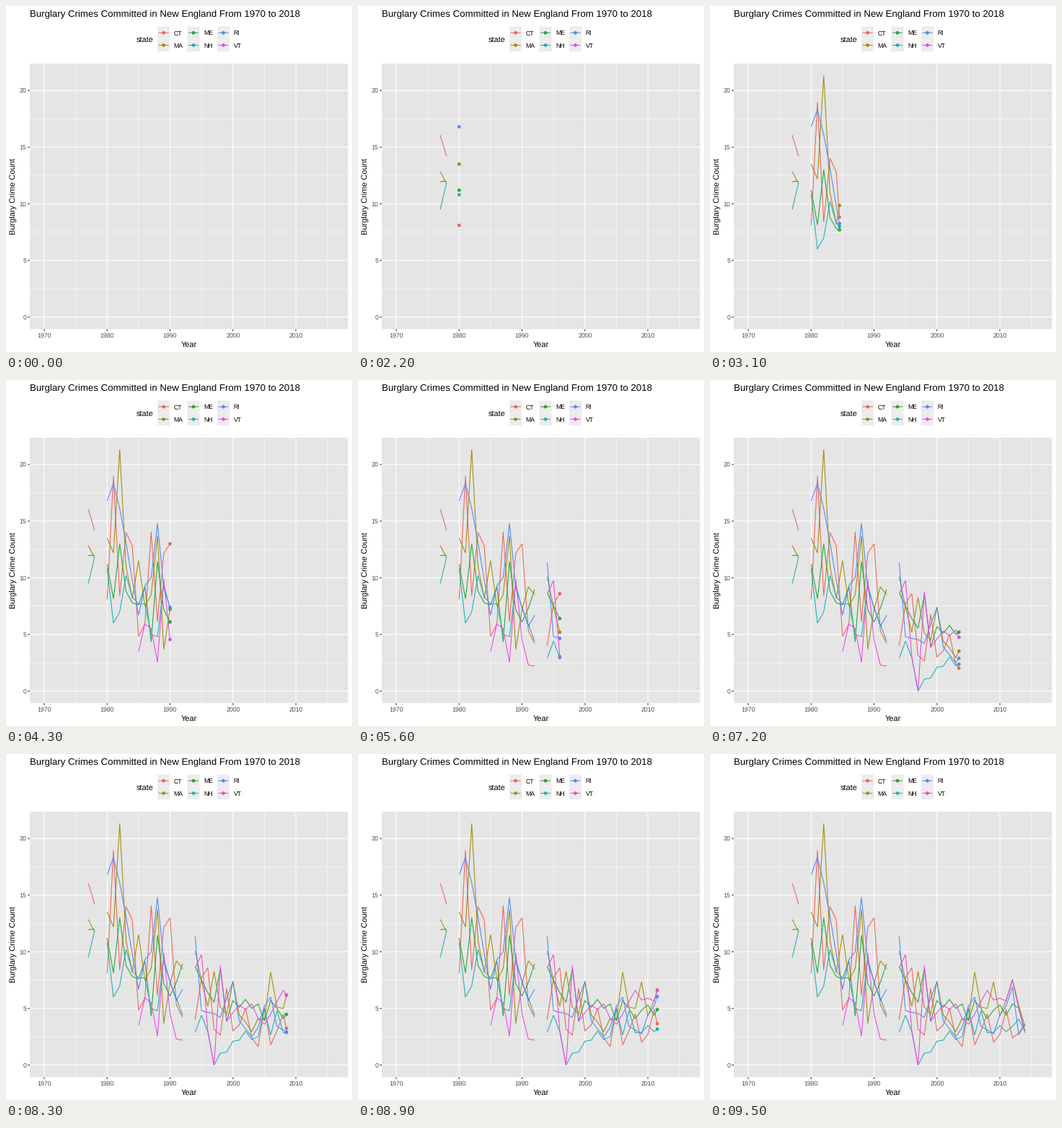
Write a matplotlib script that moves like this. It is 480 px wide and 480 px high and loops after 10 s.

```python
import matplotlib.pyplot as plt
import numpy as np
from matplotlib.animation import FuncAnimation
from matplotlib.patches import Rectangle

plt.rcParams.update({
    "font.family": "Liberation Sans",
    "text.hinting": "none",
    "path.simplify": False,
    "path.snap": False,
    "lines.solid_capstyle": "butt",
    "toolbar": "None",
})

SIZE, DPI = 480, 72
FRAMES, INTERVAL = 100, 100
FIRST, LAST = 1970, 2016
TOP_VALUE = 21.3
LEFT, RIGHT, TOP, BOTTOM = 33, 474.5, 80, 448.3
LINE, THIN, DOT = 1.07, 0.55, 4.7 ** 2

COLORS = {"CT": "#ec645c", "MA": "#a58a0b", "ME": "#1faa32",
          "NH": "#20afb3", "RI": "#5088fa", "VT": "#eb47e0"}

# Unbroken runs of yearly values, keyed by first year
RUNS = {
    "CT": {1977: [16.05, 14.2],
           1980: [8.1, 18.95, 8.4, 14, 12.8, 4.85, 5.9, 14.05, 6.15, 12.15,
                  13, 5.3, 4.2],
           1994: [4, 7.7, 8.6, 3.15, 2.65, 6.75, 3, 3.55, 5, 2.4, 1.65, 5.1,
                  1.8, 3, 4.5, 2, 2.7, 4.9, 2.4, 2.8, 3.65]},
    "MA": {1977: [12.85, 11.75],
           1980: [13.5, 12.2, 21.3, 11, 8.2, 11.5, 7.5, 8.5, 13.7, 3.7, 7.2,
                  9.2, 8.5],
           1994: [10.1, 7.4, 5.2, 8.25, 5.1, 4.5, 7.4, 4.4, 3.8, 2.95, 4.1, 4,
                  8.2, 5.1, 5, 7.35, 4.35, 5.7, 7.55, 5.3, 3.4]},
    "ME": {1977: [11.95, 12],
           1980: [11.2, 8.15, 13, 8.8, 7.8, 7.6, 9.2, 4.35, 11.45, 7.2, 6.1,
                  7.3, 8.95],
           1994: [8.65, 7.5, 6.4, 5.55, 8.5, 3.9, 5.7, 5.1, 5.8, 5, 5.4, 3.9,
                  5.7, 5, 4.1, 4.85, 5.3, 4.4, 5.4, 5, 3]},
    "NH": {1977: [9.5, 11.85],
           1980: [10.8, 6, 7, 10.2, 8.3, 7.7, 7.7, 5, 4.8, 9.4, 7.3, 5.9, 4.4],
           1994: [2.9, 4.4, 2.95, 0, 1.05, 1.15, 2.1, 2.2, 3, 2.25, 2.5, 4.9,
                  2.65, 4.8, 2.85, 2.9, 3.5, 2.95, 3.4, 4.05, 3]},
    "RI": {1980: [16.8, 18.3, 16.1, 13.1, 9.8, 6.7, 9.3, 10, 14.8, 9.1, 7.4,
                  5.7, 6.7],
           1994: [11.35, 4.8, 4.65, 4.55, 4.2, 5.9, 7.35, 3.9, 3.2, 2.5, 3.3,
                  5.2, 6, 3.4, 3.1, 2.75, 4.4, 5.2, 6.9, 2.7, 3.6]},
    "VT": {1985: [3.5, 5.95, 5.5, 2.55, 9.85, 4.55, 2.3, 2.2],
           1994: [8.6, 9.75, 3.05, 0, 8.75, 3.85, 4.6, 5.3, 4.9, 5.4, 4.1, 3.6,
                  4.5, 5.6, 6.6, 5.75, 5.9, 5.65, 7.5, 5, 2.85]},
}

years = np.arange(FIRST, LAST + 1)
# Each year is reached on a whole frame
year_frames = np.round((years - FIRST) * (FRAMES - 1) / (LAST - FIRST))


def px(year):
    return LEFT + (RIGHT - LEFT) * ((year - FIRST) / (LAST - FIRST) + 0.05) / 1.1


def py(value):
    return BOTTOM - (BOTTOM - TOP) * (value / TOP_VALUE + 0.05) / 1.1


def series(runs):
    values = np.full(len(years) + 1, np.nan)
    for start, run in runs.items():
        i = start - FIRST
        values[i:i + len(run)] = run
    return values


fig = plt.figure(figsize=(SIZE / DPI, SIZE / DPI), dpi=DPI, facecolor="white")
ax = fig.add_axes([0, 0, 1, 1])
ax.set(xlim=(0, SIZE), ylim=(SIZE, 0))
ax.axis("off")


def box(x, y, w, h, color):
    ax.add_patch(Rectangle((x, y), w, h, fc=color, lw=0, zorder=0, snap=False))


def stroke(xs, ys, color, width, z=1):
    return ax.plot(xs, ys, color=color, lw=width, zorder=z, snap=False,
                   solid_joinstyle="round")[0]


def label(x, y, text, size, color="black", ha="left", rotation=0):
    ax.text(x, y, text, size=size, color=color, ha=ha, va="baseline",
            rotation=rotation, rotation_mode="anchor")


def draw_panel():
    box(LEFT, TOP, RIGHT - LEFT, BOTTOM - TOP, "#e5e5e5")
    for year in range(1970, 2016, 5):
        x, major = px(year), year % 10 == 0
        stroke([x, x], [TOP, BOTTOM], "white", LINE if major else THIN)
        if major:
            stroke([x, x], [BOTTOM, BOTTOM + 2.75], "#333333", LINE)
            label(x, 459.8, str(year), 8.8, "#4d4d4d", "center")
    for value in np.arange(0, 20.1, 2.5):
        y, major = py(value), value % 5 == 0
        stroke([LEFT, RIGHT], [y, y], "white", LINE if major else THIN)
        if major:
            stroke([LEFT - 2.75, LEFT], [y, y], "#333333", LINE)
            label(LEFT - 4.9, y + 3.15, f"{value:.0f}", 8.8, "#4d4d4d", "right")
    label(LEFT, 15, "Burglary Crimes Committed in New England From 1970 to 2018",
          13.2)
    label((LEFT + RIGHT) / 2, 472.6, "Year", 11, ha="center")
    label(13.4, (TOP + BOTTOM) / 2, "Burglary Crime Count", 11, ha="center",
          rotation=90)


def draw_legend():
    key, step, left, top = 17.28, 41.48, 209.95, 28.5
    label(180.6, 50, "state", 11)
    centers = []
    for i, (state, color) in enumerate(COLORS.items()):
        x, y = left + step * (i // 2), top + key * (i % 2)
        mid = y + key / 2
        box(x, y, key, key, "#ececec")
        stroke([x + 0.1 * key, x + 0.9 * key], [mid, mid], color, LINE)
        label(x + key + 5.5, mid + 3.3, state, 8.8)
        centers.append((x + key / 2, mid))
    ax.scatter(*zip(*centers), s=DOT, c=list(COLORS.values()), lw=0, zorder=2)


draw_panel()
draw_legend()
data = {state: series(runs) for state, runs in RUNS.items()}
lines = {state: stroke([], [], color, LINE, 3) for state, color in COLORS.items()}
heads = ax.scatter([np.nan] * 6, [np.nan] * 6, s=DOT, c=list(COLORS.values()),
                   lw=0, zorder=4)


def update(frame):
    now = np.interp(frame, year_frames, years)
    i = int(now) - FIRST
    part = now - years[i]
    points = []
    for state, values in data.items():
        # A missing next year makes the head vanish at the end of a run
        head = values[i] + (values[i + 1] - values[i]) * part
        xs = px(np.append(years[:i + 1], now))
        ys = py(np.append(values[:i + 1], head))
        lines[state].set_data(xs, ys)
        points.append((xs[-1], ys[-1]))
    heads.set_offsets(points)
    return [*lines.values(), heads]


anim = FuncAnimation(fig, update, frames=FRAMES, interval=INTERVAL,
                     repeat=True, repeat_delay=0, blit=False)
plt.show()
```
